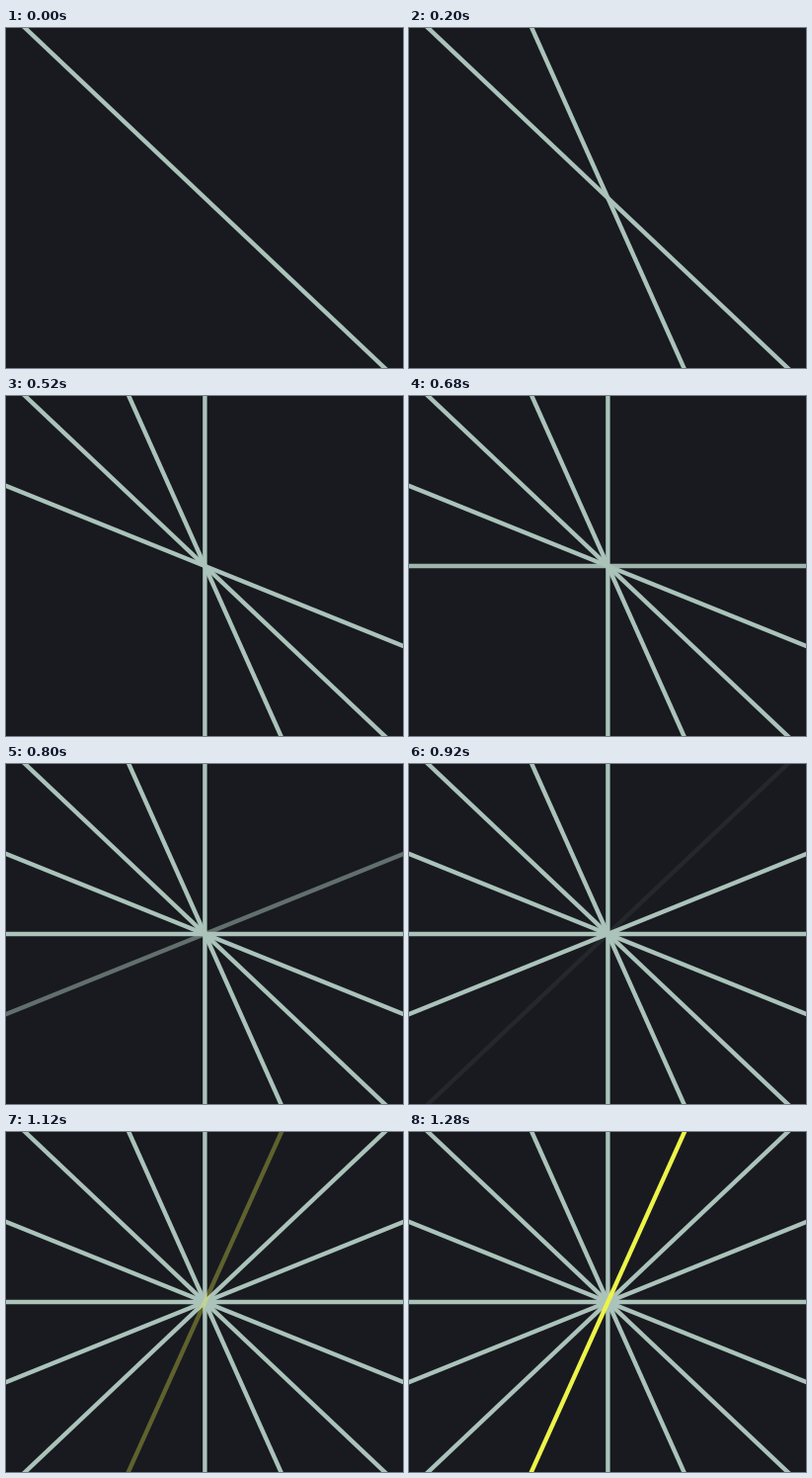
Recreate the animation shown at these times as an HTML page with a canvas. Size 402x344 px, loop 1.32 s.

```html
<!DOCTYPE html>
<html lang="en">
<head>
<meta charset="utf-8">
<title>Spokes</title>
<style>
  html, body { margin: 0; width: 100%; height: 100%; overflow: hidden; background: #181a20; }
  canvas { display: block; }
</style>
</head>
<body>
<canvas id="stage" width="402" height="344"></canvas>
<script>
const ctx = document.getElementById('stage').getContext('2d');
const LOOP = 1320, STEP = 40, STAGGER = 170, FADE = 120, FIRST = -120;
const CENTER = [201.4, 172];
// Reach of each spoke from the center, in order of appearance
const spokes = [
  [182, 172], [77, 172], [0, 172], [201, 81],
  [201, 0], [201, -81], [182, -172], [77.5, -172]
];

function drawSpoke([dx, dy], color, alpha) {
  const [x, y] = CENTER, k = 1.1;
  ctx.globalAlpha = alpha;
  ctx.strokeStyle = color;
  ctx.beginPath();
  ctx.moveTo(x - dx * k, y - dy * k);
  ctx.lineTo(x + dx * k, y + dy * k);
  ctx.stroke();
}

function draw(now) {
  const t = Math.floor((now % LOOP) / STEP) * STEP;
  ctx.globalAlpha = 1;
  ctx.fillStyle = '#181a20';
  ctx.fillRect(0, 0, 402, 344);
  ctx.lineWidth = 4.4;
  spokes.forEach((spoke, i) => {
    const start = i ? FIRST + 10 + i * STAGGER : FIRST;
    const alpha = Math.min(1, Math.max(0, (t - start) / FADE));
    if (alpha) drawSpoke(spoke, i === 7 ? '#edf448' : '#abc3ba', alpha);
  });
}

let origin;
function tick(now) {
  origin ??= now;
  draw(now - origin);
  requestAnimationFrame(tick);
}
draw(0);
requestAnimationFrame(tick);
</script>
</body>
</html>
```
